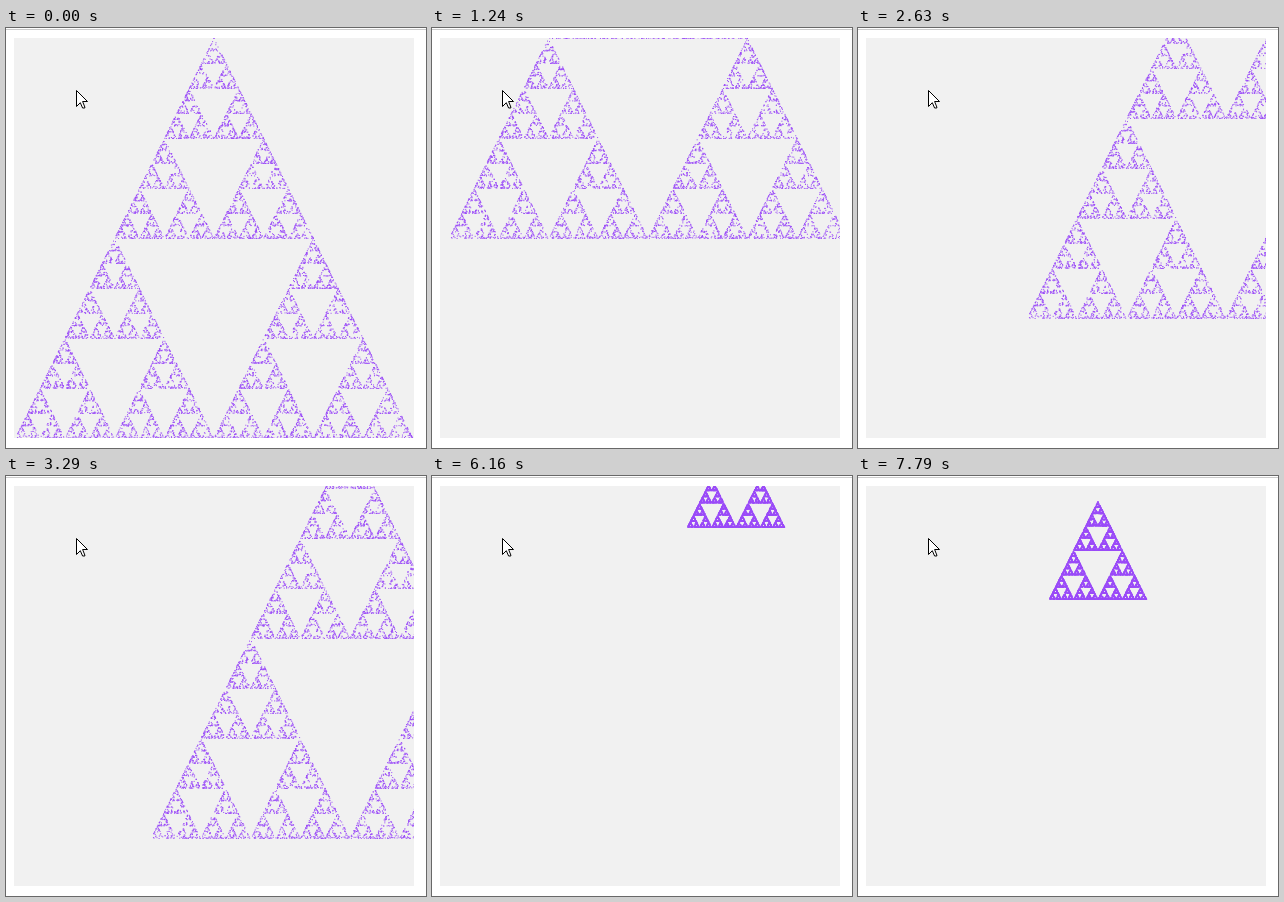
An HTML page with a canvas for the animation above (8 s loop, 420 by 420 pixels).

```html
<!DOCTYPE html>
<html>
<head>
<meta charset="utf-8">
<style>
html, body { margin: 0; width: 100%; height: 100%; overflow: hidden; background: #fff; }
canvas { display: block; }
</style>
</head>
<body>
<canvas id="stage" width="420" height="420"></canvas>
<script>
const ctx = document.getElementById('stage').getContext('2d');
const LOOP = 8000;

// Each key changes some of: x and y offset from the middle, size
const keys = [
  { t: 0, x: 0, y: 0, size: 400 },
  { t: 150, y: -8 }, { t: 440, y: -24 }, { t: 580, y: -64 }, { t: 730, y: -96 },
  { t: 860, y: -128 }, { t: 980, y: -160 }, { t: 1120, y: -192 },
  { t: 1240, x: 8, y: -200 }, { t: 1550, x: 24 }, { t: 1670, x: 56 },
  { t: 1790, x: 88 }, { t: 1950, x: 128 }, { t: 2090, x: 160, y: -192 },
  { t: 2360, y: -184 }, { t: 2490, y: -152 }, { t: 2630, y: -120 },
  { t: 2750, y: -88 }, { t: 2900, y: -56 }, { t: 3020, x: 152, y: -48 },
  { t: 3290, x: 136 },
  { t: 4810, x: 96, size: 132 }, { t: 4940, size: 114 }, { t: 5060, size: 98 },
  { t: 5340, y: -56 }, { t: 5590, y: -64 }, { t: 5750, y: -112 },
  { t: 5890, y: -144 }, { t: 6010, y: -176 }, { t: 6160, y: -208 },
  { t: 6280, y: -240 }, { t: 6430, y: -256 }, { t: 6840, y: -248 },
  { t: 6980, y: -216 }, { t: 7100, y: -184 }, { t: 7250, y: -152 },
  { t: 7380, x: 88, y: -136 }, { t: 7520, x: 80 }, { t: 7670, x: 64 },
  { t: 7790, x: 32 }
];

function seeded(seed) {
  return () => {
    seed = (seed + 0x6d2b79f5) | 0;
    let n = Math.imul(seed ^ (seed >>> 15), 1 | seed);
    n = (n + Math.imul(n ^ (n >>> 7), 61 | n)) ^ n;
    return ((n ^ (n >>> 14)) >>> 0) / 4294967296;
  };
}

// Chaos game inside a triangle centred on 0,0, a little narrower than high
function chaosGame(count) {
  const random = seeded(7);
  const corners = [[0, -0.5], [-0.497, 0.5], [0.497, 0.5]];
  const points = [];
  let [x, y] = corners[0];
  for (let i = 0; i < count; i++) {
    const [cx, cy] = corners[Math.floor(random() * 3)];
    x = (x + cx) / 2;
    y = (y + cy) / 2;
    points.push([x, y]);
  }
  return points;
}

const points = chaosGame(10000);
const pointer = new Path2D('M70.5 62.5V78.5L74.3 74.7L76.6 80H78.8V79L76.6 73.5H81.5Z');

function draw({ x, y, size }) {
  ctx.fillStyle = '#fff';
  ctx.fillRect(0, 0, 420, 420);
  ctx.fillStyle = '#ccc';
  ctx.fillRect(0, 1, 420, 1);

  ctx.save();
  ctx.beginPath();
  ctx.rect(8, 10, 400, 400);
  ctx.clip();
  ctx.fillStyle = '#f1f1f1';
  ctx.fillRect(8, 10, 400, 400);
  ctx.fillStyle = '#9b4cf8';
  for (const [px, py] of points) {
    ctx.fillRect(207.5 + x + px * size, 210 + y + py * size, 1, 1);
  }
  ctx.restore();

  ctx.fillStyle = '#fff';
  ctx.fill(pointer);
  ctx.strokeStyle = '#000';
  ctx.lineWidth = 1;
  ctx.stroke(pointer);
}

let shown = -1;
function frame() {
  const t = performance.now() % LOOP;
  const passed = keys.filter(key => key.t <= t);
  if (passed.length !== shown) {
    shown = passed.length;
    draw(Object.assign({}, ...passed));
  }
  requestAnimationFrame(frame);
}
frame();
</script>
</body>
</html>
```
